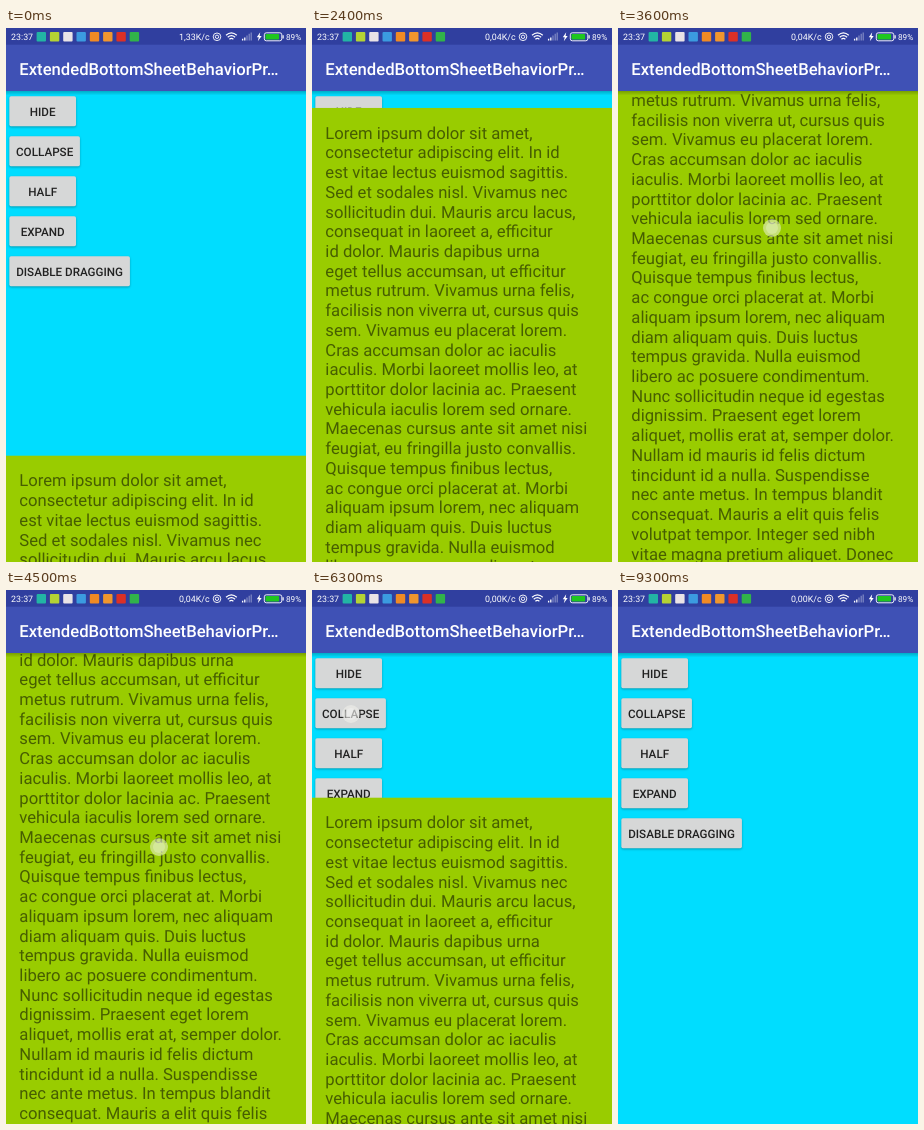
Recreate the animation shown at these times as an HTML page. Size 300x534 px, loop 9.4 s.

```html
<!DOCTYPE html>
<html lang="en">
<head>
<meta charset="utf-8">
<title>Bottom sheet demo</title>
<style>
html, body { margin: 0; width: 100%; height: 100%; overflow: hidden; background: #00ddff; }
svg { display: block; width: 100vw; height: 100vh; font-family: Roboto, sans-serif; text-rendering: geometricPrecision; }
.body { font-size: 16.667px; fill: #000; fill-opacity: .54; }
.label { font-size: 11.667px; font-weight: 500; fill: #212121; text-anchor: middle; }
.title { font-size: 16.667px; font-weight: 500; fill: #fff; }
.status { font-size: 8.9px; fill: #fff; }
</style>
</head>
<body>
<svg id="stage" viewBox="0 0 300 534" preserveAspectRatio="none">
  <defs>
    <linearGradient id="fade" x1="0" y1="0" x2="0" y2="1">
      <stop offset="0" stop-color="#000" stop-opacity=".22"/>
      <stop offset="1" stop-color="#000" stop-opacity="0"/>
    </linearGradient>
    <filter id="soft" x="-10%" y="-20%" width="120%" height="150%"><feGaussianBlur stdDeviation=".9"/></filter>
  </defs>
  <rect width="300" height="534" fill="#00ddff"/>
  <g id="buttons"></g>
  <g id="sheet">
    <rect width="300" height="534" fill="#99cc00"/>
    <g id="copy" class="body"></g>
  </g>
  <rect y="63" width="300" height="4.5" fill="url(#fade)"/>
  <rect y="16" width="300" height="47" fill="#3f51b5"/>
  <rect width="300" height="16.7" fill="#303f9f"/>
  <text class="title" x="13.3" y="46.9">ExtendedBottomSheetBehaviorPr…</text>
  <text class="status" x="5" y="12">23:37</text>
  <g id="icons"></g>
  <text class="status" id="speed" x="173" y="12"></text>
  <g fill="none" stroke="#fff" stroke-width=".9">
    <circle cx="211" cy="8.8" r="3.8"/>
    <circle cx="211" cy="8.8" r="1.7"/>
    <path d="M220 7.2q5.4-4.8 10.8 0M221.7 9.3q3.7-3.2 7.4 0M223.4 11.3q2-1.7 4 0" stroke-width="1.2"/>
    <path d="M236.6 12.6v-1.8M238.8 12.6v-3.2" stroke-width="1.3"/>
    <path d="M241 12.6v-5M243.2 12.6v-6.8M245.2 12.6v-8" stroke-width="1.2" opacity=".4"/>
    <rect x="258.3" y="4.8" width="17.5" height="8" rx="2"/>
    <path d="M277.1 7.2v3.2" stroke-width="1.2"/>
  </g>
  <rect x="259.5" y="6" width="13.6" height="5.6" rx=".8" fill="#1fc71f"/>
  <path d="M254.2 4.3l-3.4 5h2l-1 4 3.9-5.3h-2.1z" fill="#fff"/>
  <text class="status" x="295.2" y="11.8" text-anchor="end" style="font-size:8.2px">89%</text>
  <g id="dot">
    <circle r="9" fill="#f4f4ee" fill-opacity=".5"/>
    <circle r="6" fill="#fff" fill-opacity=".25"/>
  </g>
</svg>
<script>
const $ = id => document.getElementById(id);
const NS = "http://www.w3.org/2000/svg";
const LOOP = 9400, STEP = 100;
const EXPANDED = 63, HALF = 207.7, COLLAPSED = 427.7, HIDDEN = 535;

function add(parent, tag, attrs, text) {
  const el = document.createElementNS(NS, tag);
  for (const k in attrs) el.setAttribute(k, attrs[k]);
  if (text) el.textContent = text;
  parent.appendChild(el);
}

const lines = `Lorem ipsum dolor sit amet,
consectetur adipiscing elit. In id
est vitae lectus euismod sagittis.
Sed et sodales nisl. Vivamus nec
sollicitudin dui. Mauris arcu lacus,
consequat in laoreet a, efficitur
id dolor. Mauris dapibus urna
eget tellus accumsan, ut efficitur
metus rutrum. Vivamus urna felis,
facilisis non viverra ut, cursus quis
sem. Vivamus eu placerat lorem.
Cras accumsan dolor ac iaculis
iaculis. Morbi laoreet mollis leo, at
porttitor dolor lacinia ac. Praesent
vehicula iaculis lorem sed ornare.
Maecenas cursus ante sit amet nisi
feugiat, eu fringilla justo convallis.
Quisque tempus finibus lectus,
ac congue orci placerat at. Morbi
aliquam ipsum lorem, nec aliquam
diam aliquam quis. Duis luctus
tempus gravida. Nulla euismod
libero ac posuere condimentum.
Nunc sollicitudin neque id egestas
dignissim. Praesent eget lorem
aliquet, mollis erat at, semper dolor.
Nullam id mauris id felis dictum
tincidunt id a nulla. Suspendisse
nec ante metus. In tempus blandit
consequat. Mauris a elit quis felis
volutpat tempor. Integer sed nibh
vitae magna pretium aliquet. Donec
in sapien ut turpis varius mattis.
Aenean porta augue non lectus`.split("\n");
lines.forEach((s, i) => add($("copy"), "text", { x: 13.33, y: 30.7 + i * 19.72 }, s));

[["HIDE", 66.7], ["COLLAPSE", 70.6], ["HALF", 66.7], ["EXPAND", 66.7], ["DISABLE DRAGGING", 120.6]]
  .forEach(([name, width], i) => {
    const y = 68.3 + i * 40, box = { x: 3.33, width, height: 30, rx: 1.7 };
    add($("buttons"), "rect", { ...box, y: y + 0.9, fill: "#000", "fill-opacity": .3, filter: "url(#soft)" });
    add($("buttons"), "rect", { ...box, y, fill: "#d6d7d7" });
    add($("buttons"), "text", { class: "label", x: 3.33 + width / 2, y: y + 19.7 }, name);
  });

["#22b5a4", "#b4d334", "#e9e3e6", "#3b9be0", "#f08a24", "#f0962e", "#dc3026", "#31b34a"]
  .forEach((fill, i) => add($("icons"), "rect", { x: 30.6 + i * 13.3, y: 4, width: 9.4, height: 9.4, rx: 1, fill }));

// Each gesture is a list of [time, x, y] finger positions.
const dragUp = [[3000, 143, 373.5], [3100, 144, 360], [3300, 147, 300], [3600, 154, 200], [3800, 158, 160]];
const dragDown = [[4000, 156, 180], [4200, 155, 200], [4500, 153, 257], [4800, 150, 393.5]];
const pull = [[5000, 144, 164], [5100, 143, 182], [5300, 141, 242], [5400, 140, 275]];
const tap = (t, x, y) => [[t, x, y], [t + 50, x, y]];
const gestures = [
  tap(900, 37, 164), tap(2200, 37, 201), dragUp, dragDown, pull, tap(6300, 39, 124), tap(8300, 37, 84)
];

function follow(path, t) {
  if (t <= path[0][0]) return path[0].slice(1);
  for (let i = 1; i < path.length; i++) {
    const a = path[i - 1], b = path[i];
    if (t <= b[0]) {
      const k = (t - a[0]) / (b[0] - a[0]);
      return [a[1] + (b[1] - a[1]) * k, a[2] + (b[2] - a[2]) * k];
    }
  }
  return path[path.length - 1].slice(1);
}
const travel = (path, t) => follow(path, t)[1] - path[0][2];

// Quintic ease-out from one resting place to the next.
function settle(t, start, time, from, to) {
  const k = Math.min(1, Math.max(0, (t - start) / time));
  return to + (from - to) * (1 - k) ** 5;
}

function sheetTop(t) {
  if (t < 2200) return settle(t, 950, 430, COLLAPSED, HALF);
  if (t < 5000) return settle(t, 2250, 430, HALF, EXPANDED);
  if (t < 5400) return EXPANDED + travel(pull, t);
  if (t < 6300) return settle(t, 5400, 300, EXPANDED + travel(pull, 5400), HALF);
  if (t < 8300) return settle(t, 6360, 520, HALF, COLLAPSED);
  return settle(t, 8360, 520, COLLAPSED, HIDDEN);
}

function draw(t) {
  const scroll = -travel(dragUp, t) - travel(dragDown, t);
  $("sheet").setAttribute("transform", `translate(0 ${sheetTop(t).toFixed(2)})`);
  $("copy").setAttribute("transform", `translate(0 ${-scroll.toFixed(2)})`);
  $("speed").textContent = (t < 100 ? "1,33" : t < 4900 ? "0,04" : "0,00") + "K/c";
  const active = gestures.find(g => t >= g[0][0] && t <= g[g.length - 1][0]);
  $("dot").style.display = active ? "" : "none";
  if (active) $("dot").setAttribute("transform", `translate(${follow(active, t)})`);
}

const begin = performance.now();
function tick() {
  const t = (performance.now() - begin) % LOOP;
  draw(Math.floor(t / STEP) * STEP);
  requestAnimationFrame(tick);
}
tick();
</script>
</body>
</html>
```
